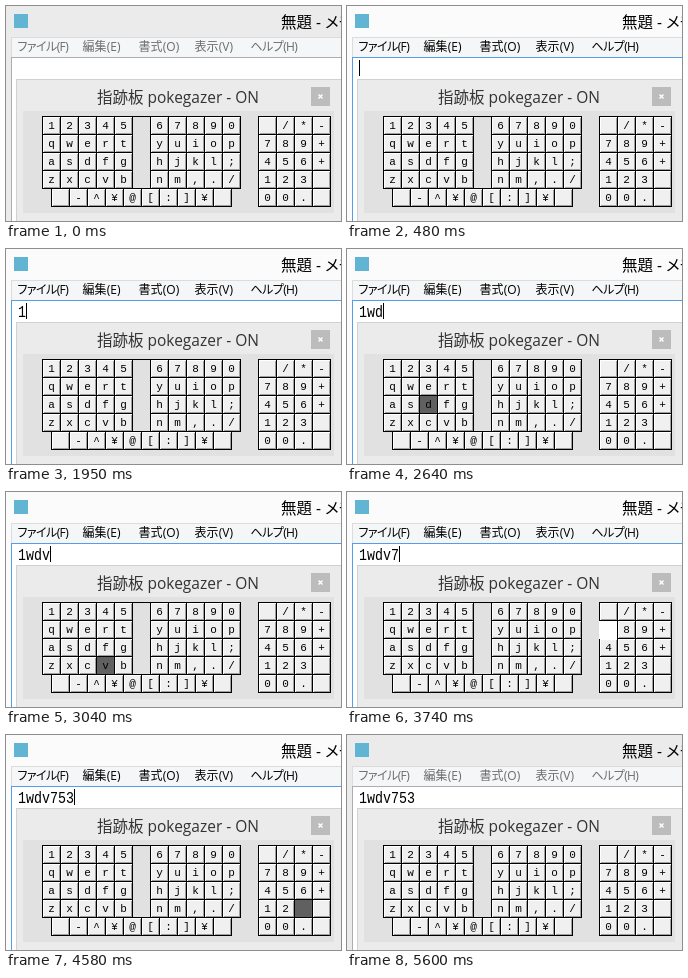
Write an HTML page that moves like this. It is 335x215 px and loops after 5680 ms.

```html
<!DOCTYPE html>
<html lang="ja">
<head>
<meta charset="utf-8">
<title>Key viewer</title>
<style>
html, body { margin: 0; width: 100%; height: 100%; overflow: hidden; background: #fff; }
svg { display: block; width: 335px; height: 215px; }
rect, .edge { shape-rendering: crispEdges; }
text { font-family: "Open Sans", "Noto Sans CJK JP", "Noto Sans CJK", sans-serif; font-feature-settings: "palt"; fill: #000; }
.menu { font-size: 12px; letter-spacing: .1px; }
.kana { letter-spacing: -.6px; }
.key { stroke: #000; }
.edge { fill: none; }
.cap { font: 11px "Liberation Mono", monospace; text-anchor: middle; }
.typed { font: 13.33px "Liberation Mono", monospace; }
</style>
</head>
<body>
<svg id="stage" viewBox="0 0 335 215" xmlns="http://www.w3.org/2000/svg">
  <rect id="frame" width="335" height="215"/>
  <rect x="8" y="8" width="14" height="14" fill="#62b5d2"/>
  <text x="275" y="22" font-size="15.5">無題 - メモ</text>
  <rect x="5" y="31" width="330" height="184" fill="#dcdcdc"/>
  <rect x="6" y="32" width="329" height="19" fill="#f5f6f7"/>
  <g id="menu"></g>
  <rect id="page" x="5.5" y="51.5" width="335" height="170" fill="#fff"/>
  <g transform="translate(12 68) scale(1 1.3)"><text id="typed" class="typed"></text></g>
  <rect id="caret" y="54" width="1" height="16"/>
  <rect x="10.5" y="73.5" width="330" height="150" fill="#ebebeb" stroke="#d2d2d2"/>
  <text x="172" y="97" font-size="15.5" text-anchor="middle" style="fill:#333">指跡板 pokegazer - ON</text>
  <rect x="305" y="81" width="19" height="19" fill="#bcbcbc"/>
  <path d="M312.5 88.5l4 4m0-4l-4 4" stroke="#fff" stroke-width="1.4"/>
  <rect x="17" y="105" width="311" height="102" fill="#e1e1e1"/>
  <path class="edge" d="M126 110.5h18" stroke="#000"/>
  <g id="keys"></g>
  <rect id="blank" width="18" height="18" fill="#fff"/>
</svg>
<script>
const LOOP = 5680, FOCUS = 480, BLUR = 5600, SIZE = 18;
const $ = id => document.getElementById(id);

function add(parent, tag, attrs, text = '') {
  const el = document.createElementNS('http://www.w3.org/2000/svg', tag);
  for (const name in attrs) el.setAttribute(name, attrs[name]);
  el.textContent = text;
  parent.appendChild(el);
  return el;
}

[['ファイル(F)', 11.5], ['編集(E)', 76.5], ['書式(O)', 132.5], ['表示(V)', 188.5], ['ヘルプ(H)', 244.5]]
  .forEach(([label, x]) => add($('menu'), 'text',
    { x, y: 45, class: /[ァ-ヶ]/.test(label) ? 'menu kana' : 'menu' }, label));

// One key: black outline, raised edges, caption.
function addKey(x, y, ch) {
  const g = add($('keys'), 'g', { transform: `translate(${x} ${y})` });
  const box = add(g, 'rect', { x: .5, y: .5, width: SIZE, height: SIZE, class: 'key' });
  const bevel = add(g, 'g', {});
  add(bevel, 'path', { d: 'M1.5 18V1.5H18', class: 'edge', stroke: '#fff' });
  add(bevel, 'path', { d: 'M2 17.5H17.5V2', class: 'edge', stroke: '#a0a0a0' });
  const cap = add(g, 'text', { x: 9.5, y: 13, class: 'cap' }, ch);
  return { x, y, box, bevel, cap };
}

// Each block of keys: name, left, top, rows.
const blocks = [
  ['left', 36, 110, ['12345', 'qwert', 'asdfg', 'zxcvb']],
  ['right', 144, 110, ['67890', 'yuiop', 'hjkl;', 'nm,./']],
  ['low', 45, 182, [' -^¥@[:]¥ ']],
  ['pad', 252, 110, [' /*-', '789+', '456+', '123 ', '00. ']]
];
const keys = {};
for (const [name, left, top, rows] of blocks) {
  rows.forEach((row, r) => [...row].forEach((ch, c) => {
    keys[name + ch] = addKey(left + c * SIZE, top + r * SIZE, ch);
  }));
}
$('keys').setAttribute('fill', '#f0f0f0');

// Strokes: character, block, start, fully pressed, released, first look.
const strokes = [
  ['1', 'left', 1800, 1880, 1950, 'bare'],
  ['w', 'left', 2180, 2180, 2270],
  ['d', 'left', 2640, 2640, 2730],
  ['v', 'left', 3040, 3040, 3190],
  ['7', 'pad', 3740, 3820, 3880, 'blank'],
  ['5', 'pad', 4110, 4190, 4280, 'blank'],
  ['3', 'pad', 4580, 4660, 4750, 'bare']
].map(([ch, block, start, full, end, look]) =>
  ({ ch, key: keys[block + ch], start, full, end, look }));

const caretOff = [[1110, 1570], [3570, 3740], [5130, BLUR]];

function draw(t) {
  const active = t >= FOCUS && t < BLUR;
  $('frame').style.fill = active ? '#fbfbfb' : '#ebebeb';
  $('page').style.stroke = active ? '#569de5' : '#abadb3';
  for (const item of $('menu').children) item.style.fill = active ? '#000' : '#6d6d6d';

  const typed = strokes.filter(s => t >= s.start).map(s => s.ch).join('');
  $('typed').textContent = typed;
  $('caret').setAttribute('x', 12 + 8 * typed.length);
  const lit = active && !caretOff.some(([a, b]) => t >= a && t < b);
  $('caret').style.display = lit ? '' : 'none';

  $('blank').style.display = 'none';
  for (const { key, start, full, end, look } of strokes) {
    const down = t >= start && t < end;
    const early = down && t < full;
    key.box.style.fill = down ? '#606060' : '';
    key.bevel.style.display = down ? 'none' : '';
    key.cap.style.display = early ? 'none' : '';
    if (early && look === 'blank') {
      $('blank').style.display = '';
      $('blank').setAttribute('x', key.x);
      $('blank').setAttribute('y', key.y + 1);
    }
  }
}

const begin = performance.now();
function tick() {
  draw((performance.now() - begin) % LOOP);
  requestAnimationFrame(tick);
}
tick();
</script>
</body>
</html>
```
